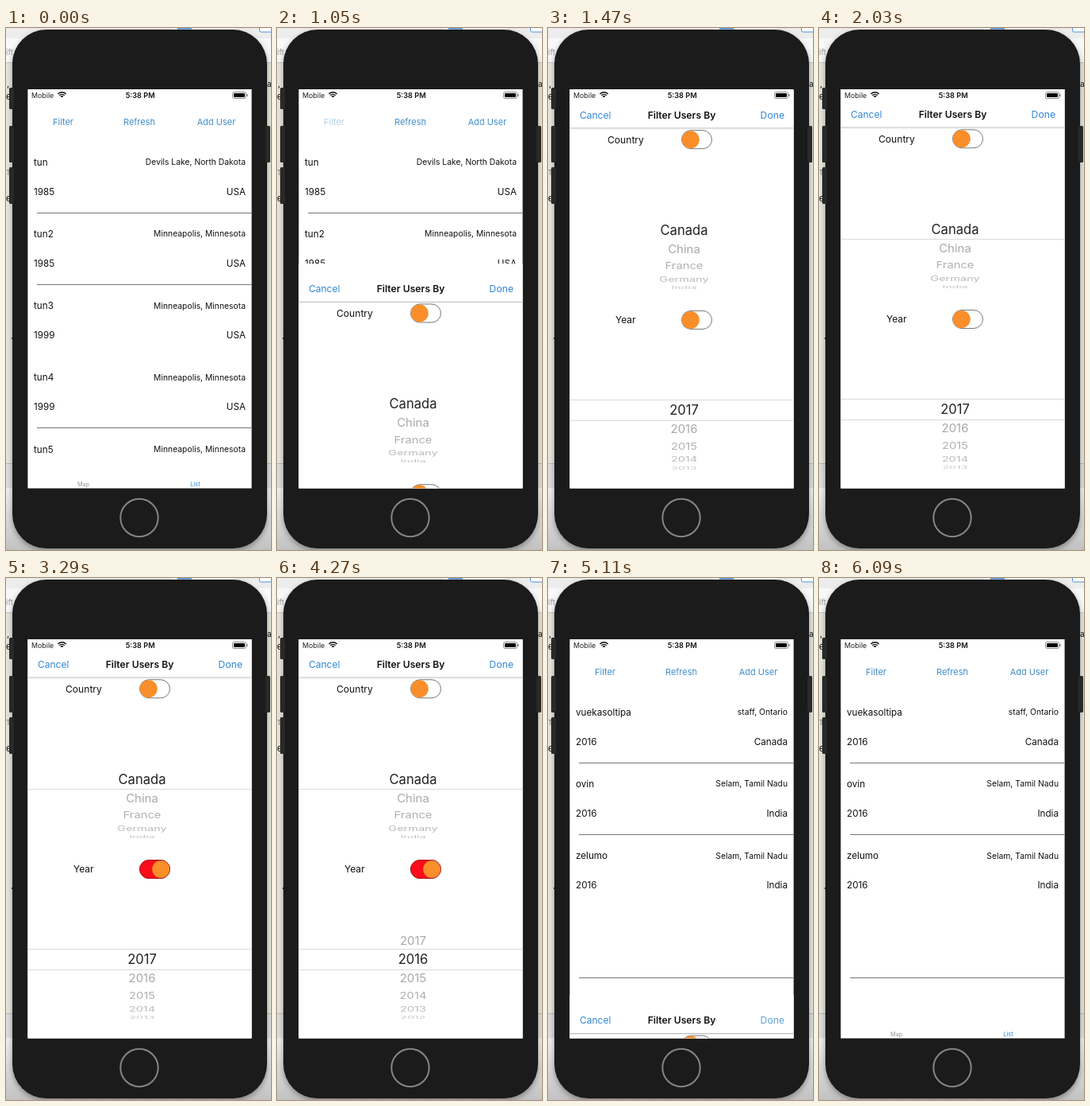
Write an HTML page with a canvas that moves like this. It is 334 by 656 pixels and loops after 6160 ms.

```html
<!DOCTYPE html>
<html lang="en">
<head>
<meta charset="utf-8">
<style>
  html, body { margin: 0; width: 100%; height: 100%; overflow: hidden; background: #e6e6dc; }
  canvas { display: block; width: 334px; height: 656px; }
</style>
</head>
<body>
<canvas id="stage"></canvas>
<script>
const W = 334, H = 656, LOOP = 6160;
const SCREEN = { x: 27.4, y: 77, w: 282.2, h: 501.4 };
const LINK = '#418ec9', NAV_LINK = '#2f86d5', ORANGE = '#fa8e2a';
const canvas = document.getElementById('stage');
const ctx = canvas.getContext('2d');
const ratio = window.devicePixelRatio || 1;
canvas.width = W * ratio;
canvas.height = H * ratio;

const allUsers = [
  ['tun', 'Devils Lake, North Dakota', '1985', 'USA'],
  ['tun2', 'Minneapolis, Minnesota', '1985', 'USA'],
  ['tun3', 'Minneapolis, Minnesota', '1999', 'USA'],
  ['tun4', 'Minneapolis, Minnesota', '1999', 'USA'],
  ['tun5', 'Minneapolis, Minnesota', '', '']
];
const filteredUsers = [
  ['vuekasoltipa', 'staff, Ontario', '2016', 'Canada'],
  ['ovin', 'Selam, Tamil Nadu', '2016', 'India'],
  ['zelumo', 'Selam, Tamil Nadu', '2016', 'India']
];
const countries = ['Canada', 'China', 'France', 'Germany', 'India'];
const years = Array.from({ length: 8 }, (_, i) => String(2017 - i));

const clamp = v => Math.max(0, Math.min(1, v));
const progress = (t, start, length) => clamp((t - start) / length);
const smooth = p => p * p * (3 - 2 * p);

// Remaining distance (1 to 0) of a critically damped spring.
function springRest(t, start, rate) {
  const s = Math.max(0, t - start) / 1000 * rate;
  return (1 + s) * Math.exp(-s);
}

function text(str, x, y, size, color = '#111', align = 'left', weight = 400) {
  ctx.font = `${weight} ${size}px Inter, "Liberation Sans", sans-serif`;
  ctx.textAlign = align;
  ctx.fillStyle = color;
  ctx.fillText(str, x, y + size * 0.36);
}

function rect(x, y, w, h, color) {
  ctx.fillStyle = color;
  ctx.fillRect(x, y, w, h);
}

function rounded(x, y, w, h, r, fill, stroke) {
  ctx.beginPath();
  ctx.roundRect(x, y, w, h, r);
  if (fill) { ctx.fillStyle = fill; ctx.fill(); }
  if (stroke) { ctx.strokeStyle = stroke; ctx.lineWidth = 1; ctx.stroke(); }
}

function clipped(x, y, w, h, draw) {
  ctx.save();
  ctx.beginPath();
  ctx.rect(x, y, w, h);
  ctx.clip();
  draw();
  ctx.restore();
}

function drawDesktop() {
  rect(0, 0, W, H, '#e6e6dc');
  rect(0, 0, W, 13, '#ededed');
  rect(0, 13, W, 30, '#f8f8f8');
  rect(0, 43, W, 1, '#c4c4c4');
  rect(0, 547, W, 1, '#b5b5b5');
  rect(0, 548, W, 30, '#dedede');
  const floor = ctx.createLinearGradient(0, 578, 0, H);
  floor.addColorStop(0, '#f0f0f0');
  floor.addColorStop(1, '#c2c2c2');
  rect(0, 578, W, 78, floor);
  rect(208, 0, 80, 2, '#fafafa');
  rect(216, 0, 18, 1.5, '#4a90e2');
  rounded(319.5, -4, 20, 9, 2, '#fff', '#4a90e2');
  text('ift', 0, 30, 10, '#999');
  text(',', 1, 70, 11);
  text('e', 0, 86, 11);
  text('T', 0, 182, 9, '#777');
  text('e', 0, 214, 11);
  text('a', 329, 70, 10);
  rect(7, 389, 2, 2, '#444');
}

function drawPhone() {
  ctx.save();
  ctx.shadowColor = 'rgba(0,0,0,.35)';
  ctx.shadowBlur = 7 * ratio;
  ctx.shadowOffsetY = 3 * ratio;
  rounded(8, 2, 321, 652, 43, '#1b1b1b');
  ctx.restore();
  for (const [x, y, h] of [[4, 75, 27], [4, 123, 46], [4, 175, 46], [327, 123, 46]])
    rounded(x, y, 6, h, 1.5, '#292929');
  ctx.beginPath();
  ctx.arc(168, 615.5, 23.7, 0, Math.PI * 2);
  ctx.strokeStyle = '#858585';
  ctx.lineWidth = 2;
  ctx.stroke();
}

function drawStatusBar() {
  text('Mobile', 32, 84.5, 8.9, '#222');
  ctx.strokeStyle = '#111';
  ctx.lineWidth = 1.5;
  for (const r of [2, 4.6, 7.2]) {
    ctx.beginPath();
    ctx.arc(70.5, 88, r, -Math.PI * 0.75, -Math.PI * 0.25);
    ctx.stroke();
  }
  text('5:38 PM', 169.2, 84.7, 9.2, '#111', 'center', 600);
  rounded(285.5, 80.5, 17, 8, 2, null, '#888');
  rounded(287, 82, 14, 5, 1, '#000');
  rect(303.5, 83, 1.2, 3, '#777');
}

function drawList(users, filterAlpha) {
  rect(27, SCREEN.y, 284, 503, '#fff');
  ctx.globalAlpha = filterAlpha;
  text('Filter', 72, 118, 11, LINK, 'center');
  ctx.globalAlpha = 1;
  text('Refresh', 168, 118, 11, LINK, 'center');
  text('Add User', 265, 118, 11, LINK, 'center');
  users.forEach(([name, place, year, country], i) => {
    const y = 168.5 + i * 90.2;
    text(name, 35, y, 11.7);
    text(place, 302, y, 10.35, '#111', 'right');
    text(year, 35, y + 37, 11.7);
    text(country, 302, y + 37, 11.7, '#111', 'right');
  });
  for (const y of [232, 322, 502]) rect(39, y, 271, 1, '#777');
  text('Map', 97.5, 573, 7.3, '#929292', 'center');
  text('List', 238.5, 573, 7.4, '#268bd2', 'center');
}

function drawSwitch(y, on) {
  rounded(168.5, y - 11.5, 38, 23, 11.5, '#fff', '#777');
  ctx.globalAlpha = on;
  rounded(168.5, y - 11.5, 38, 23, 11.5, '#fb0d1b', '#a51a20');
  ctx.globalAlpha = 1;
  ctx.beginPath();
  ctx.arc(179.8 + 15.4 * on, y, 11, 0, Math.PI * 2);
  ctx.fillStyle = ORANGE;
  ctx.fill();
}

function drawWheel(items, cy, position) {
  const rows = (size, color, radius, fade) => items.forEach((label, i) => {
    const angle = (i - position) * 0.318;
    if (Math.abs(angle) > 1.4) return;
    const depth = Math.cos(angle);
    ctx.save();
    ctx.translate(171.5, cy + radius * Math.sin(angle));
    ctx.scale(0.92 + 0.08 * depth, depth);
    ctx.globalAlpha = fade ? 0.5 + 0.5 * depth : 1;
    text(label, 0, 0, size, color, 'center');
    ctx.restore();
  });
  clipped(27, cy - 90, 283, 77, () => rows(15, '#a6a6a6', 76, true));
  clipped(27, cy + 13, 283, 77, () => rows(15, '#a6a6a6', 76, true));
  clipped(27, cy - 13, 283, 26, () => rows(16.6, '#222', 80, false));
}

function drawFilterSheet(offset, switchOn, yearPosition, doneAlpha) {
  ctx.save();
  ctx.translate(0, offset);
  rect(27, SCREEN.y, 284, 503, '#fff');
  rect(27, 124.6, 283, 1, '#b2b2b2');
  rect(27, 125.6, 283, 1, '#f0f0f0');
  text('Cancel', 40, 108.5, 12, NAV_LINK);
  text('Filter Users By', 168.5, 108.5, 12.2, '#111', 'center', 600);
  ctx.globalAlpha = doneAlpha;
  text('Done', 298, 108.5, 12.2, NAV_LINK, 'right');
  ctx.globalAlpha = 1;
  text('Country', 75, 139.5, 12.1);
  drawSwitch(139.3, 0);
  drawWheel(countries, 253, 0);
  if (offset < 0.5) rect(27, 265, 283, 1, '#d9d9d9');
  text('Year', 85, 366, 12);
  drawSwitch(366, switchOn);
  drawWheel(years, 479.5, yearPosition);
  rect(27, 466, 283, 1, '#d9d9d9');
  rect(27, 492, 283, 1, '#d9d9d9');
  ctx.restore();
}

function render(t) {
  ctx.setTransform(ratio, 0, 0, ratio, 0, 0);
  drawDesktop();
  drawPhone();

  const opening = springRest(t, 933, 16);
  const closing = 1 - springRest(t, 4925, 20.4);
  let offset = SCREEN.h * Math.max(opening, closing);
  if (offset < 0.4) offset = 0;

  const filterAlpha = t >= 880 && t < 1100 ? 0.4 : 1;
  const doneAlpha = 1 - 0.22 * progress(t, 4800, 80);
  const switchOn = smooth(progress(t, 2760, 190));
  const yearPosition = smooth(progress(t, 3550, 600));

  clipped(SCREEN.x, SCREEN.y, SCREEN.w, SCREEN.h, () => {
    drawList(t < 3000 ? allUsers : filteredUsers, filterAlpha);
    if (offset < SCREEN.h - 0.5) drawFilterSheet(offset, switchOn, yearPosition, doneAlpha);
    drawStatusBar();
  });
}

const began = performance.now();
function tick() {
  render((performance.now() - began) % LOOP);
  requestAnimationFrame(tick);
}
tick();
</script>
</body>
</html>
```
